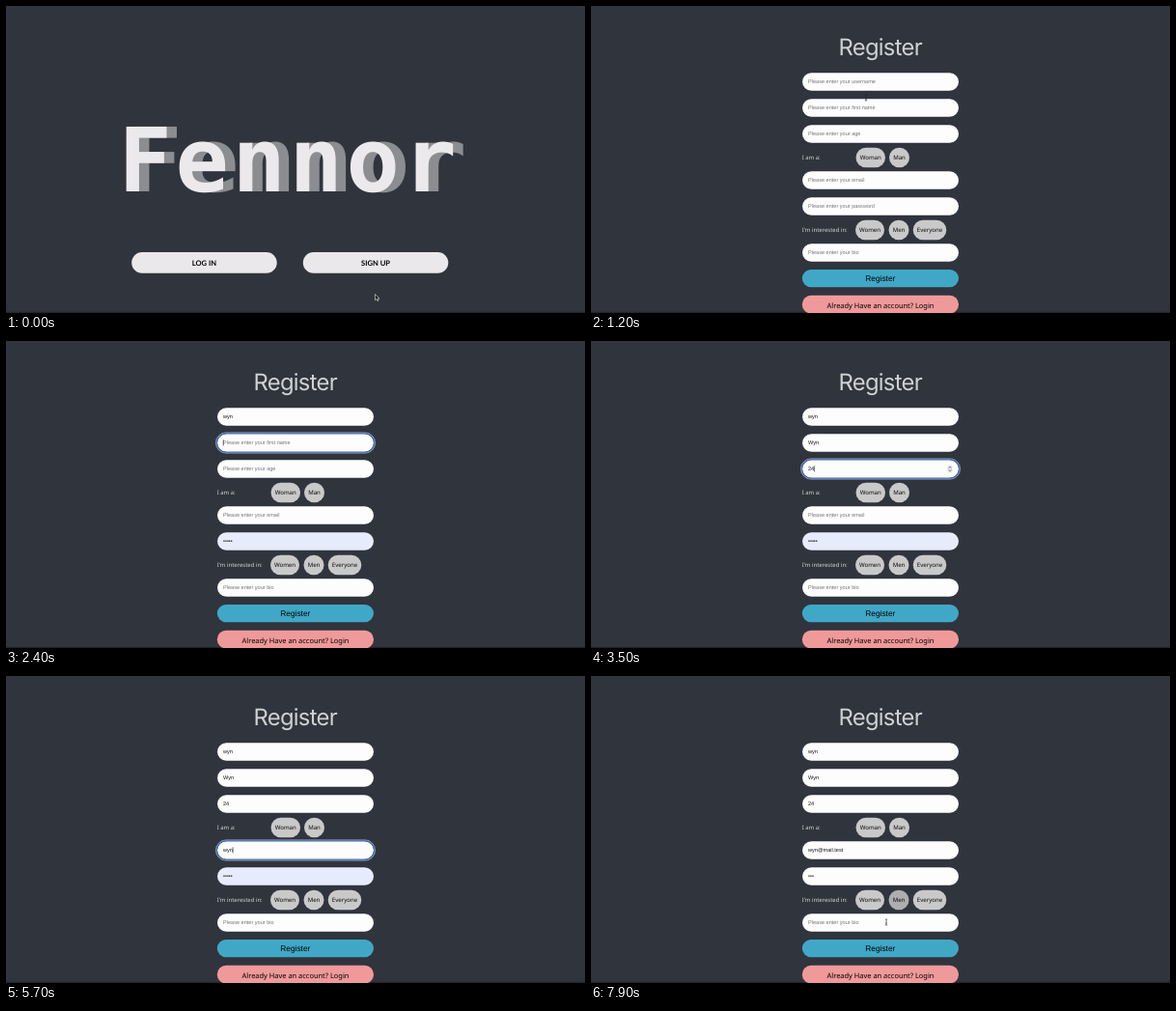
An HTML page for the animation above (8000 ms loop, 600 by 318 pixels).

```html
<!DOCTYPE html>
<html lang="en">
<head>
<meta charset="utf-8">
<title>Sign-up form</title>
<style>
  html, body { margin: 0; width: 100%; height: 100%; overflow: hidden; background: #30343d; }
  svg { display: block; width: 100%; height: 100%; }
  text { text-rendering: geometricPrecision; white-space: pre; }
  .brand { font: bold 92px "DejaVu Sans Mono", monospace; letter-spacing: 3.6px; }
  .cta { font: 700 7.6px Lato, sans-serif; text-anchor: middle; }
  .heading { font: 400 23.8px Inter, sans-serif; letter-spacing: -.03em; text-anchor: middle; fill: #d0d1d3; }
  .input { font: 5.57px "Liberation Sans", Arial, sans-serif; fill: #111; }
  .hint { fill: #75757a; }
  .label { font: 5.95px "Noto Sans", sans-serif; fill: #d3d4d6; }
  .pill { font: 500 6.1px "Noto Sans", sans-serif; text-anchor: middle; fill: #0c0c0c; }
  .submit { font: 8.36px "Liberation Sans", Arial, sans-serif; text-anchor: middle; }
  .login { font: 500 7.45px "Noto Sans", sans-serif; text-anchor: middle; }
  .menu { font: 500 5.3px Inter, sans-serif; fill: #1d1d20; }
  .address { font-weight: 600; }
  .status { font: 5.9px "Liberation Sans", Arial, sans-serif; fill: #333; }
</style>
</head>
<body>
<svg id="stage" viewBox="0 0 600 318" preserveAspectRatio="none"></svg>
<script>
const LOOP = 8000, STEP = 100;
const stage = document.getElementById('stage');
const pen = document.createElement('canvas').getContext('2d');

// Each table lists [start time, value]; a value holds until the next one.
const typed = {
  username: [[0, ''], [1400, 'owner'], [1600, ''], [1900, 'w'], [2000, 'wy'], [2100, 'wyn']],
  first: [[0, ''], [2500, 'W'], [2600, 'Wy'], [2700, 'Wyn']],
  age: [[0, ''], [3000, '2'], [3400, '24']],
  email: [[0, ''], [5200, 'w'], [5400, 'wy'], [5700, 'wyn'], [5900, 'wyn@'],
    ...[...'mail.test'].map((_, i, all) => [6100 + i * 60, 'wyn@' + all.slice(0, i + 1).join('')])],
  password: [[0, ''], [1400, '•••••'], [7000, ''], [7100, '•'], [7200, '••'], [7300, '•••']],
  bio: [[0, '']]
};
const focus = [[0, ''], [1300, 'username'], [2300, 'first'], [2900, 'age'], [4000, ''],
  [4400, 'email'], [6700, 'password'], [7600, '']];
const menus = [[0, ''], [1300, 'username'], [1900, ''], [4400, 'email'], [5200, ''],
  [6800, 'password'], [7000, '']];
const pointer = [[0, 'arrow'], [500, 'hand'], [600, 'arrow'], [1200, 'beam'], [1500, ''],
  [3700, 'beam'], [3800, 'arrow'], [4000, 'hand'], [4300, 'beam'], [4800, ''],
  [7400, 'arrow'], [7600, 'hand'], [7900, 'beam']];

// Pointer path: [time, x, y], straight between points.
const route = [[0, 382.5, 298.5], [200, 382.5, 298.5], [500, 380, 266], [600, 376, 267],
  [700, 367.5, 268], [1200, 285, 95], [1300, 265, 82], [3700, 265, 82], [4000, 290, 157],
  [4200, 290, 157], [4400, 264.8, 178.5], [4800, 264.8, 178.5], [7400, 300, 200], [7600, 319, 232],
  [7800, 319, 232], [7900, 306, 255]];

const inputs = [['username', 78.5, 'username'], ['first', 105.5, 'first name'], ['age', 132.5, 'age'],
  ['email', 180.5, 'email'], ['password', 207.5, 'password'], ['bio', 255.5, 'bio']];
const pills = [['Woman', 274.5, 30.5, 157], ['Man', 309, 21, 157], ['Women', 274, 30, 232],
  ['Men', 308.5, 21, 232], ['Everyone', 333.7, 34.6, 232]];
const addresses = ['dorenit47@example.com', 'tovel8@demo.test',
  'path4sunnygardening6@example.com', 'bzt@mail.test'];

const at = (table, t) => table.filter(([start]) => start <= t).pop()[1];
const text = (kind, x, y, words, extra = '') => `<text class="${kind}" x="${x}" y="${y}" ${extra}>${words}</text>`;
const box = (x, y, w, h, r, fill, extra = '') =>
  `<rect x="${x}" y="${y}" width="${w}" height="${h}" rx="${r}" fill="${fill}" ${extra}/>`;
const line = (d, color, width, extra = '') =>
  `<path d="${d}" fill="none" stroke="${color}" stroke-width="${width}" ${extra}/>`;

function textWidth(words) {
  pen.font = '55.7px "Liberation Sans", Arial, sans-serif';
  return pen.measureText(words).width / 10;
}

function position(t) {
  const next = route.findIndex(([time]) => time > t);
  if (next < 0) return route[route.length - 1].slice(1);
  const [t0, x0, y0] = route[next - 1], [t1, x1, y1] = route[next];
  const k = (t - t0) / (t1 - t0);
  return [x0 + (x1 - x0) * k, y0 + (y1 - y0) * k];
}

function cursor(t) {
  const shapes = {
    arrow: '<path d="M0 0V6.2L1.5 4.9 2.5 7.1 3.5 6.7 2.5 4.6H4.5Z" fill="#111" stroke="#eee" stroke-width=".6"/>',
    hand: '<path d="M-.7 0Q0-.8.7 0V2.5L3.5 3.3V5.5L2.7 7.5H-1L-3 4.5Q-2.5 3.5-.7 4.7Z" fill="#fff" stroke="#111" stroke-width=".6"/>',
    beam: line('M-1.2-3.2Q0-3.2 0-2.4 0-3.2 1.2-3.2M0-2.4V2.4M-1.2 3.2Q0 3.2 0 2.4 0 3.2 1.2 3.2M-.8 1H.8', '#222', .6)
  };
  const [x, y] = position(t);
  return `<g transform="translate(${x} ${y})">${shapes[at(pointer, t)] || ''}</g>`;
}

function home() {
  const button = (x, words) => box(x, 255, 150.5, 21.8, 10.9, '#ebe8ec') + text('cta', x + 75.2, 268.5, words);
  return text('brand', 127, 192, 'Fennor', 'fill="#8b8d91"') +
    text('brand', 116.5, 192, 'Fennor', 'fill="#ece9ed"') +
    button(130.2, 'LOG IN') + button(307.8, 'SIGN UP');
}

function input([name, y, noun], t) {
  const value = at(typed[name], t), active = at(focus, t) === name;
  const autofilled = (name === 'password' && t >= 1400 && t < 7000) ||
    (name === 'username' && t >= 1400 && t < 1600);
  let out = box(219, y - 9.3, 162, 18.6, 9.3, autofilled ? '#e7ecfc' : '#fdfdfe');
  if (active) {
    out += box(218.3, y - 9.8, 163.4, 19.6, 9.8, 'none', 'stroke="#3f6cba" stroke-width="1.3"') +
      box(217.4, y - 10.7, 165.2, 21.4, 10.7, 'none', 'stroke="#d5dff0" stroke-width=".5"');
  }
  out += value ? text('input', 225, y + 1.9, value) : text('input hint', 225, y + 1.9, 'Please enter your ' + noun);
  if (active) {
    const x = 225.2 + textWidth(value);
    out += line(`M${x} ${y - 3.2}V${y + 3}`, '#111', .6);
    if (name === 'age') {
      out += box(369.5, y - 4, 5, 8, 1.5, '#e3e3e5') +
        line(`M370.8 ${y - 1}l1.2-1.3 1.2 1.3M370.8 ${y + 1}l1.2 1.3 1.2-1.3`, '#444', .7);
    }
  }
  return out;
}

function pill([name, x, w, y], t) {
  const pressed = (name === 'Woman' && t >= 4000 && t < 4400) || (name === 'Men' && t >= 7600);
  const fill = !pressed ? '#c9c9ca' : t >= 7900 ? '#aeaeb0' : '#a2a2a4';
  return box(x, y - 10.3, w, 20.6, 10.3, fill) + text('pill', x + w / 2, y + 2.1, name);
}

function passwordMenu(y) {
  const account = (name, top, dots) =>
    `<circle cx="227" cy="${top + 2.4}" r="2.4" fill="none" stroke="#333" stroke-width=".8"/>` +
    line(`M225.2 ${top + 1.6}l2 .8 .2 2M227 ${top + .3}l1 1.4 1.3.4`, '#333', .8) +
    text('menu', 235.7, top, name) +
    line(`M236.7 ${top + 7.3}h${(dots - 1) * 2.6 + .1}`, '#222', 1.1, 'stroke-linecap="round" stroke-dasharray="0 2.6"');
  return box(219, y, 162, 68.5, 1, '#fdfdfe') +
    account('owner', y + 12.8, 5) + account('QEL', y + 37, 15) +
    line(`M219 ${y + 51.3}h162`, '#dcdcdf', .6) +
    `<circle cx="227" cy="${y + 60.2}" r="1.6" fill="none" stroke="#222" stroke-width="1"/>` +
    `<circle cx="227" cy="${y + 60.2}" r="2.3" fill="none" stroke="#222" stroke-width=".7" stroke-dasharray=".9"/>` +
    text('menu', 235.7, y + 62.3, 'Manage Passwords...');
}

function emailMenu() {
  return box(219, 190.5, 162, 80, 1, '#fdfdfe') +
    addresses.map((address, i) => text('menu address', 223.7, 203.1 + i * 15, address)).join('') +
    line('M219 253.8h162', '#dcdcdf', .6) + text('menu', 223.7, 264.3, 'Manage...');
}

function register(t) {
  const menu = at(menus, t);
  return text('heading', 299.7, 51, 'Register') +
    inputs.map(item => input(item, t)).join('') +
    text('label', 218.7, 158.8, 'I am a:') + text('label', 218.7, 233.8, 'I\'m interested in:') +
    pills.map(item => pill(item, t)).join('') +
    box(218.8, 273, 162.2, 18.2, 9.1, '#40a8c6') + text('submit', 299.8, 285, 'Register') +
    box(218.8, 299.8, 162.2, 18.6, 9.2, '#f0999a') +
    text('login', 300, 312.5, 'Already Have an account? Login') +
    (menu === 'username' ? passwordMenu(88.5) : menu === 'password' ? passwordMenu(217.5) :
      menu === 'email' ? emailMenu() : '');
}

function status(t) {
  return t < 500 || t >= 1000 ? '' :
    box(-2, 309.7, 60.5, 10, 1.5, '#dcdee2') + text('status', 1.5, 315.8, 'localhost:3001/register');
}

function draw(t) {
  stage.innerHTML = box(0, 0, 600, 318, 0, '#30343d') + box(0, 316.8, 600, 2, 0, '#23262d') +
    (t < 600 ? home() : register(t)) + status(t) + cursor(t);
}

let shown = -1;
function tick() {
  const t = Math.floor(performance.now() % LOOP / STEP) * STEP;
  if (t !== shown) draw(shown = t);
  requestAnimationFrame(tick);
}
tick();
</script>
</body>
</html>
```
